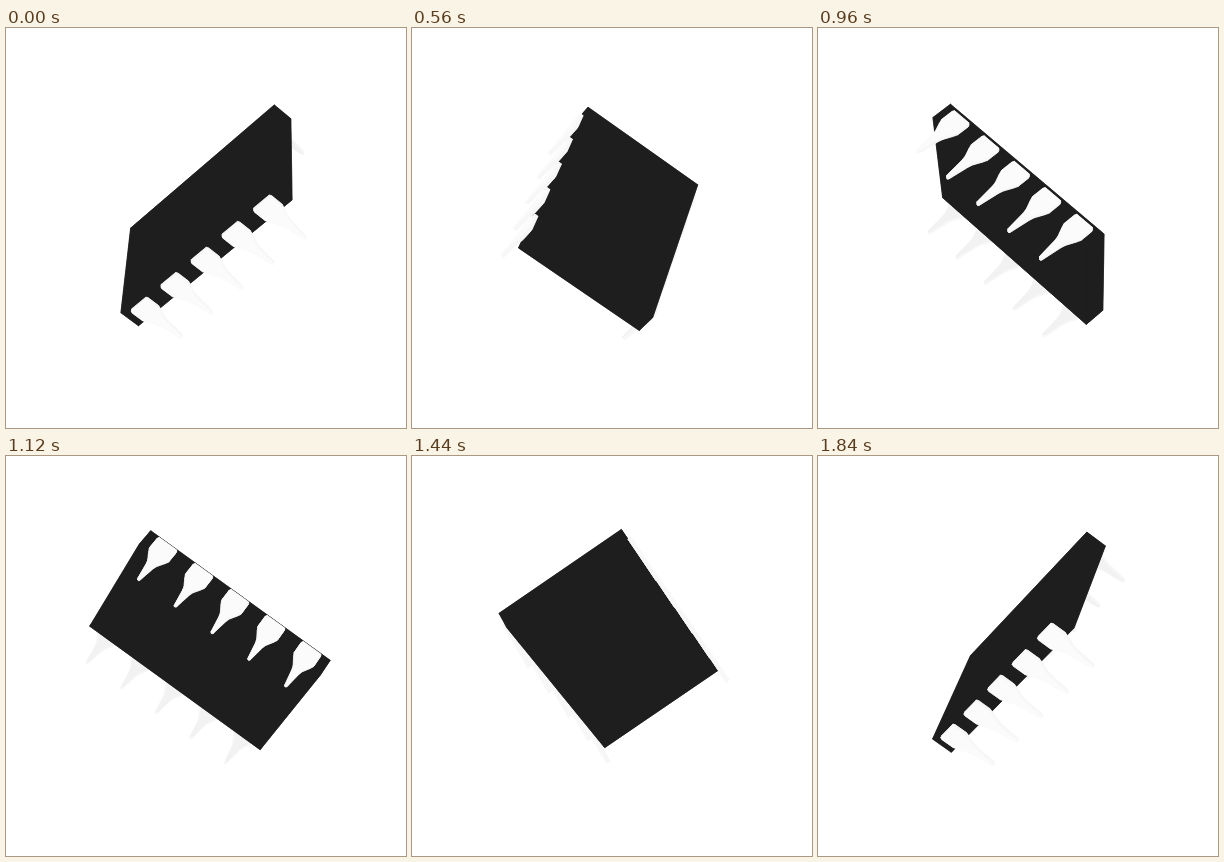
Recreate the animation shown at these times as an HTML page with a canvas. Size 400 px wide and 400 px high, loop 1.92 s.

```html
<!DOCTYPE html>
<html lang="en">
<head>
<meta charset="utf-8">
<title>Spinning chip</title>
<style>
  html, body { margin: 0; width: 100%; height: 100%; overflow: hidden; background: #fff; }
  canvas { display: block; }
</style>
</head>
<body>
<canvas width="400" height="400"></canvas>
<script>
const ctx = document.querySelector('canvas').getContext('2d');
const RAD = Math.PI / 180;
const STEP = 80, STEPS = 24;
const CAMERA = 1750, TILT = .02;
const CENTER = { x: 200.7, y: 186.8 };

// Chip axes (width, length, thickness): horizontal reach, heading, drop per unit
const AXES = [
  { reach: .828, heading: 92.2, drop: .566 },
  { reach: .810, heading: 212, drop: .585 },
  { reach: .816, heading: -26.6, drop: .581 }
];
const HALF = { w: 71.2, l: 108, t: 11.7 };

// Half of the pin outline: offset along the length, position along the thickness
const SIDE = [[10.5, -7.4], [11.5, -5.2], [11.5, 8.5], [9.5, 13.5], [5.3, 22.5], [4.1, 27.5], [1.3, 50], [.5, 51]];
const OUTLINE = [...SIDE, ...SIDE.map(([u, t]) => [-u, t]).reverse()];
const PIN_DEPTH = 3.8;
const COLOR = { body: '#1e1e1e', outer: '#fbfbfb', inner: '#f2f2f2', rim: '#f7f7f7' };

let angle = 0;

function project(point) {
  let x = 0, y = 0, depth = 0;
  AXES.forEach(({ reach, heading, drop }, i) => {
    const turn = (heading - angle) * RAD;
    x += point[i] * reach * Math.cos(turn);
    depth -= point[i] * reach * Math.sin(turn);
    y += point[i] * drop;
  });
  const scale = CAMERA / (CAMERA + depth);
  return [CENTER.x + x * scale, CENTER.y + (y - depth * TILT) * scale];
}

function fill(points, color) {
  ctx.beginPath();
  points.forEach(p => ctx.lineTo(...project(p)));
  ctx.closePath();
  ctx.fillStyle = ctx.strokeStyle = color;
  ctx.lineWidth = .5;
  ctx.fill();
  ctx.stroke();
}

function prism(front, back, frontColor, backColor, rimColor) {
  fill(back, backColor);
  front.forEach((p, i) => {
    const j = (i + 1) % front.length;
    fill([p, front[j], back[j], back[i]], rimColor);
  });
  fill(front, frontColor);
}

function pinRow(side, near) {
  for (let i = -2; i <= 2; i++) {
    const plate = w => OUTLINE.map(([u, t]) => [side * w, i * HALF.l * .4 + u, t]);
    const outer = plate(HALF.w + PIN_DEPTH), inner = plate(HALF.w);
    if (near) prism(outer, inner, COLOR.outer, COLOR.inner, COLOR.rim);
    else prism(inner, outer, COLOR.inner, COLOR.outer, COLOR.rim);
  }
}

function body() {
  const face = t => [[-1, -1], [1, -1], [1, 1], [-1, 1]].map(([w, l]) => [w * HALF.w, l * HALF.l, t]);
  prism(face(HALF.t), face(-HALF.t), COLOR.body, COLOR.body, COLOR.body);
}

function draw(now) {
  angle = Math.floor(now / STEP) % STEPS * 360 / STEPS;
  ctx.clearRect(0, 0, 400, 400);
  const nearSide = Math.sin((AXES[0].heading - angle) * RAD) > 0 ? 1 : -1;
  pinRow(-nearSide, false);
  body();
  pinRow(nearSide, true);
  requestAnimationFrame(draw);
}
draw(0);
</script>
</body>
</html>
```
